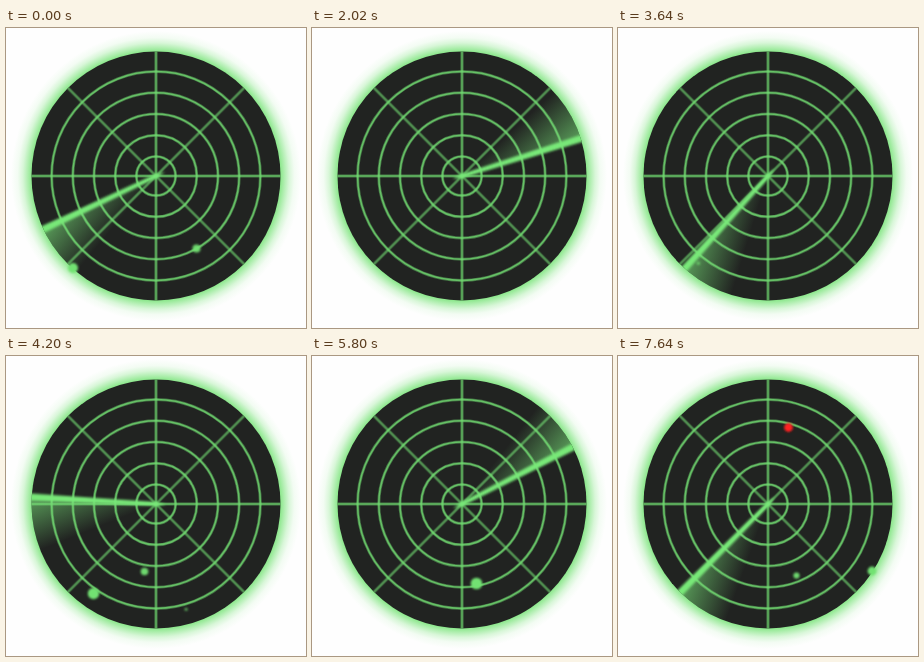
Write an HTML page that moves like this. It is 300 by 300 pixels and loops after 7.79 s.

```html
<!DOCTYPE html>
<html lang="en">
<head>
<meta charset="utf-8">
<title>Radar sweep</title>
<style>
  html, body { margin: 0; width: 100%; height: 100%; overflow: hidden; background: #fefefe; }
  svg { display: block; width: 100vw; height: 100vh; }
</style>
</head>
<body>
<svg viewBox="0 0 300 300">
  <defs>
    <radialGradient id="halo" gradientUnits="userSpaceOnUse" r="148" cx="0" cy="0">
      <stop offset=".842" stop-color="#72e272" stop-opacity=".8"/>
      <stop offset=".872" stop-color="#72e272" stop-opacity=".52"/>
      <stop offset=".9" stop-color="#72e272" stop-opacity=".27"/>
      <stop offset=".935" stop-color="#72e272" stop-opacity=".08"/>
      <stop offset=".98" stop-color="#72e272" stop-opacity="0"/>
    </radialGradient>
    <linearGradient id="fade" gradientUnits="userSpaceOnUse" x1="0" y1="0" x2="22.3" y2="47.9">
      <stop offset="0" stop-color="#77dd77" stop-opacity="0"/>
      <stop offset="1" stop-color="#77dd77" stop-opacity=".65"/>
    </linearGradient>
    <filter id="soft" filterUnits="userSpaceOnUse" x="-150" y="-150" width="300" height="300">
      <feGaussianBlur stdDeviation=".8"/>
    </filter>
    <clipPath id="disc"><circle r="124.5"/></clipPath>
  </defs>
  <rect width="300" height="300" fill="#fefefe"/>
  <g transform="translate(150 148)">
    <circle r="148" fill="url(#halo)"/>
    <circle r="124.5" fill="#212321"/>
    <g clip-path="url(#disc)">
      <g id="grid" fill="none" stroke="#70d870"></g>
      <g id="sweep">
        <path d="M0 0H125A125 125 0 0 0 113.3 -52.8Z" fill="url(#fade)"/>
        <path d="M-10 0L0 -2L126 -3.5V3.5L0 2Z" fill="#78e878" filter="url(#soft)"/>
      </g>
    </g>
    <g id="blips" filter="url(#soft)"></g>
  </g>
</svg>
<script>
const LOOP = 7790;
const FRAME = 134;                 // typical hold, ms
const START_ANGLE = 154.7;         // degrees, clockwise from east
const SPEED = 0.093;               // degrees per ms
const BLIP_FADE = 500;             // ms from peak to nothing

// The hold length drifts a little between these moments.
const TEMPO = [0, 120, 1180, 2300, 3490, 4590, 5650, 6740, LOOP];

// The larger contacts, as offsets from the centre at their peak.
const CONTACTS = [
  { peak: 0, x: 40.5, y: 72.5, r: 4 },
  { peak: 0, x: -83, y: 92, r: 5 },
  { peak: 4200, x: -11.5, y: 67.5, r: 4 },
  { peak: 4200, x: -62.5, y: 89.5, r: 6 },
  { peak: 5800, x: 14.5, y: 79.5, r: 6 },
  { peak: 7640, x: 20.5, y: -76.5, r: 5.7 },
  { peak: 7640, x: 28.5, y: 71.5, r: 4 },
  { peak: 7640, x: 104, y: 67, r: 5.7 }
];

const byId = id => document.getElementById(id);
const sweep = byId('sweep');

function add(parent, tag, attrs) {
  const el = document.createElementNS('http://www.w3.org/2000/svg', tag);
  for (const name in attrs) el.setAttribute(name, attrs[name]);
  return parent.appendChild(el);
}

// A thin bright line over a wider faint one.
function glowLine(tag, attrs, width, strength) {
  add(byId('grid'), tag, { ...attrs, 'stroke-width': width * 2, opacity: 0.4 * strength });
  add(byId('grid'), tag, { ...attrs, 'stroke-width': width, opacity: 0.7 * strength });
}

for (let i = 0; i < 4; i++) {
  glowLine('line', { x1: -125, x2: 125, transform: `rotate(${i * 45})` }, 1.8, i % 2 ? 0.65 : 0.85);
}
for (let i = 0; i < 5; i++) {
  glowLine('circle', { r: 19.6 + i * 21.2 }, 1.5, 1.1);
}

function seededRandom(seed) {
  return () => (seed = seed * 16807 % 2147483647) / 2147483647;
}

// Faint specks appear now and then near the lower rim.
const random = seededRandom(41);
const specks = Array.from({ length: 6 }, (_, i) => {
  const angle = Math.PI * (0.25 + 0.5 * random());
  const distance = 95 + 20 * random();
  return {
    peak: (i + random()) * LOOP / 6,
    x: distance * Math.cos(angle),
    y: distance * Math.sin(angle),
    r: 2
  };
});

// Contacts in the upper half are red.
const blips = [...CONTACTS, ...specks].map(blip => ({
  ...blip,
  el: add(byId('blips'), 'circle', {
    cx: blip.x, cy: blip.y,
    fill: blip.y < 0 ? '#ff2020' : '#72e272',
    opacity: Math.min(1, 0.55 + blip.r / 10)
  })
}));

// The picture holds still between evenly spaced changes.
function heldTime(t) {
  const next = TEMPO.findIndex(mark => mark > t);
  const from = TEMPO[next - 1], span = TEMPO[next] - from;
  const count = Math.round(span / FRAME);
  const index = Math.min(count - 1, Math.floor(count * (t - from + 15) / span));
  return from + index * span / count;
}

function draw(time) {
  const t = heldTime(time % LOOP);
  sweep.setAttribute('transform', `rotate(${START_ANGLE + SPEED * t})`);
  for (const { peak, r, el } of blips) {
    el.setAttribute('r', r * Math.max(0, 1 - Math.abs(t - peak) / BLIP_FADE));
  }
}

const start = performance.now();
function tick() {
  draw(performance.now() - start);
  requestAnimationFrame(tick);
}
tick();
</script>
</body>
</html>
```
